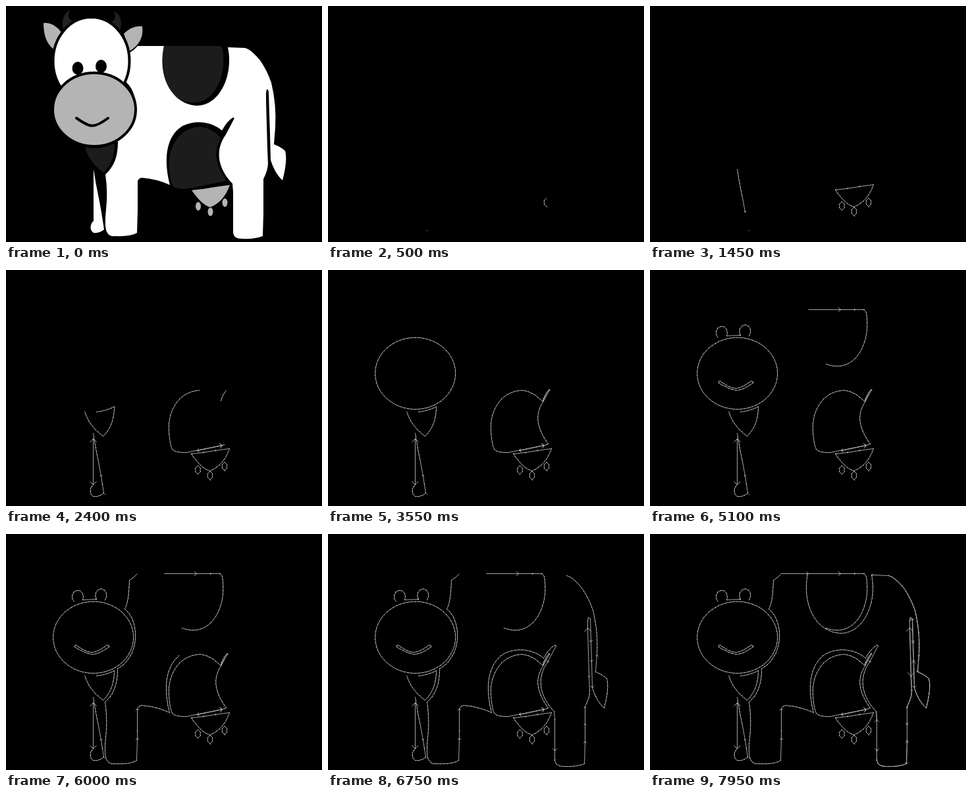
Recreate the animation shown at these times as an HTML page with a canvas. Size 480 px wide and 360 px high, loop 8000 ms.

```html
<!DOCTYPE html>
<html lang="en">
<head>
<meta charset="utf-8">
<title>Cow outline</title>
<style>
  html, body { margin: 0; width: 100%; height: 100%; overflow: hidden; background: #000; }
  canvas { display: block; }
</style>
</head>
<body>
<canvas width="480" height="360"></canvas>
<script>
const ctx = document.querySelector('canvas').getContext('2d');
const LOOP = 8000, TRACE_START = 500, STEP = 50;
const GRAY = '#b4b4b4', DARK = '#1c1c1c';

// Ellipse that starts at its top and runs counter-clockwise.
const oval = (x, y, rx, ry) =>
  `M${x} ${y - ry} A${rx} ${ry} 0 0 0 ${x} ${y + ry} A${rx} ${ry} 0 0 0 ${x} ${y - ry}`;

const teats = [oval(332.5, 300, 4, 6.5), oval(292, 305.5, 4, 6.5), oval(310.5, 314, 4, 6.5)];
const udder = 'M340 273 L318 276 L300 279 L282 281 Q297 303 310 307 Q331 299 340 273';
const farLeg = 'M133 249 Q136 270 141 293 L145 315 L147 328 L149 341 Q142 347 133 346 Q127 342 129 334 Q131 329 133 328 L133 258 L133 328 L133 258';
const neck = 'M120 216 Q127 239 148 254 Q165 238 165 209 Q154 215 138 217';
const tip = 'M335 184 Q330 190 327 200';
const spotLeft = 'M295 184 C258 186 246 223 248 245 Q249 266 253 274 Q256 279 274 279 L329 268 L291 276 L329 268 L332 267';
const spotRight = 'M332 267 L335 266 C314 237 317 217 327 202 Q313 186 295 184';
const tipBack = 'M327 202 L337 183 L327 200';
const muzzle = oval(133.2, 158.2, 61, 54.7);
const mouth = 'M107 170 Q124 182 131 181 Q139 181 154 170 Q158 170 157 173 Q139 185 131 184 Q122 183 105 173 Q104 169 107 170';
const eyes = 'M104 104 A8.5 10 0 1 1 117 101 L138 100 A8.5 10 0 1 1 151 101';
const patch = 'M241 61 L290 61 L312 61 L326 61 Q330 64 330 75 C334 115 310 160 268 144';
const body = {
  headSide: 'M200 61 L194 67 L188 71 Q187 105 181 115 C194 125 198 144 197 160 C196 180 185 198 170 206',
  frontLeg: 'M170 206 C170 227 166 243 151 257 Q155 285 152 310 Q149 340 154 346 Q157 352 165 351 Q190 352 199 346 L200 312 L200 300 L200 267 Q202 262 207 262 Q230 264 249 273',
  spotEdge: 'M249 273 C240 238 241 200 268 183 C290 172 315 178 328 190 Q336 175 345 170 L347 171 L334 196 C318 218 320 246 344 271',
  hindLeg: 'M344 271 L345 284 L345 331 L345 346 Q346 355 358 355 Q378 356 390 351 L391 317 L391 290 L391 264 Q398 250 398 240 L397 217 L395 144 L395 133',
  tail: 'M395 133 Q396 123 399 130 L400 165 L401 195 L402 235 Q408 255 420 266 Q428 235 424 221 Q416 214 407 211',
  back: 'M407 211 L409 185 Q411 150 403 117 Q396 97 386 83 Q372 66 363 64',
  patchEdge: 'M363 64 L337 63 C346 105 325 152 290 152 C253 150 231 110 240 61 M200 61 L241 61'
};

const svgPath = document.createElementNS('http://www.w3.org/2000/svg', 'path');

// Splits a path into short pieces; a straight line stays one piece.
function segments(d) {
  const result = [];
  let pen = [0, 0];
  for (const command of d.match(/[MLQCA][^MLQCA]*/g)) {
    const end = command.slice(1).trim().split(/\s+/).slice(-2).map(Number);
    if (command[0] !== 'M') {
      svgPath.setAttribute('d', `M${pen.join(' ')} ${command}`);
      const length = svgPath.getTotalLength();
      const count = command[0] === 'L' ? 1 : Math.max(2, Math.ceil(length / 6));
      let from = pen;
      for (let i = 1; i <= count; i++) {
        const p = svgPath.getPointAtLength(length * i / count);
        result.push([from, from = [p.x, p.y]]);
      }
    }
    pen = end;
  }
  return result;
}

const reversed = list => list.map(([a, b]) => [b, a]).reverse();
const stroke = (start, end, d) => ({ start, end, parts: segments(d) });

const strokes = [
  stroke(500, 600, teats[0]),
  stroke(600, 750, teats[1]),
  stroke(750, 900, teats[2]),
  stroke(900, 1300, udder),
  stroke(1300, 1750, farLeg),
  stroke(1750, 2100, neck),
  stroke(2100, 2180, tip),
  stroke(2180, 2450, spotLeft),
  stroke(2450, 2850, spotRight),
  stroke(2850, 3050, tipBack),
  stroke(3050, 3600, muzzle),
  stroke(3900, 4350, mouth),
  stroke(4350, 4850, eyes),
  stroke(4850, 5150, patch),
  stroke(5200, 5600, body.headSide),
  stroke(5600, 5950, body.frontLeg),
  stroke(5950, 6250, body.spotEdge),
  stroke(6250, 6450, body.hindLeg),
  stroke(6450, 6650, body.tail),
  stroke(6650, 6800, body.back),
  stroke(6800, 7300, body.patchEdge),
  { start: 7300, end: 8000, parts: reversed(segments(body.hindLeg + body.tail + body.back)) }
];

const bodyOutline = Object.values(body).map((d, i) => i ? d.replace(/^M\S+ \S+/, '') : d).join(' ');

function shape(d, fill, outline = 0) {
  const path = new Path2D(d);
  if (fill) {
    ctx.fillStyle = fill;
    ctx.fill(path);
  }
  if (outline) {
    ctx.strokeStyle = '#000';
    ctx.lineWidth = outline;
    ctx.stroke(path);
  }
}

function drawCow() {
  ctx.lineCap = 'round';
  shape(bodyOutline, '#fff');
  shape(patch + ' C246 134 231 100 240 61 Z', DARK);
  shape(spotLeft + spotRight.replace('M', 'L'), DARK);
  shape(farLeg, '#fff');
  shape(neck, DARK);
  shape(udder, GRAY);
  teats.forEach(d => shape(d, GRAY));
  shape('M57 26 Q72 24 84 40 L74 67 Q57 56 57 26 Z', GRAY);
  shape('M179 42 Q193 29 207 31 Q210 56 187 69 Z', GRAY);
  shape('M97 6 Q82 15 87 37 L103 24 Q91 21 97 6 Z', '#222');
  shape('M164 8 Q179 16 173 37 L157 25 Q170 22 164 8 Z', '#222');
  shape(oval(129.5, 84, 58, 67), '#fff', 4);
  shape(oval(109, 95, 8.5, 10), '#000');
  shape(oval(144.5, 92, 8.5, 10), '#000');
  shape(oval(134, 158, 63, 56), GRAY, 4);
  shape('M107 171 Q124 183 131 182.5 Q139 183 155 171', null, 4);
}

// The arrowhead takes a tenth of the length of its line.
function addArrow(path, [[x1, y1], [x2, y2]]) {
  const angle = Math.atan2(y2 - y1, x2 - x1);
  const head = Math.hypot(x2 - x1, y2 - y1) * 0.1;
  path.moveTo(x1, y1);
  path.lineTo(x2, y2);
  if (head < 1) return;
  for (const side of [-1, 1]) {
    const a = angle + side * Math.PI / 4;
    path.moveTo(x2, y2);
    path.lineTo(x2 - head * Math.cos(a), y2 - head * Math.sin(a));
  }
}

function drawTrace(time) {
  const visible = strokes.flatMap(({ start, end, parts }) => {
    const progress = Math.min(1, Math.max(0, (time - start) / (end - start)));
    return parts.slice(0, Math.floor(progress * parts.length));
  });
  // A single path keeps retraced lines from growing brighter.
  const path = new Path2D();
  visible.forEach(part => addArrow(path, part));

  ctx.save();
  ctx.translate(-0.5, -0.5);
  ctx.lineCap = 'butt';
  ctx.lineWidth = 1;
  ctx.strokeStyle = '#a4a4a4';
  ctx.stroke(path);
  ctx.fillStyle = '#dcdcdc';
  ctx.fillRect(150.5, 342.5, 1, 1);
  for (const [, [x, y]] of visible) ctx.fillRect(Math.round(x) - 0.5, Math.round(y) - 0.5, 1, 1);
  ctx.restore();
}

function frame(now) {
  const time = now % LOOP;
  ctx.fillStyle = '#000';
  ctx.fillRect(0, 0, 480, 360);
  if (time < TRACE_START) drawCow();
  else drawTrace((Math.floor(time / STEP) + 1) * STEP);
  requestAnimationFrame(frame);
}
requestAnimationFrame(frame);
</script>
</body>
</html>
```
